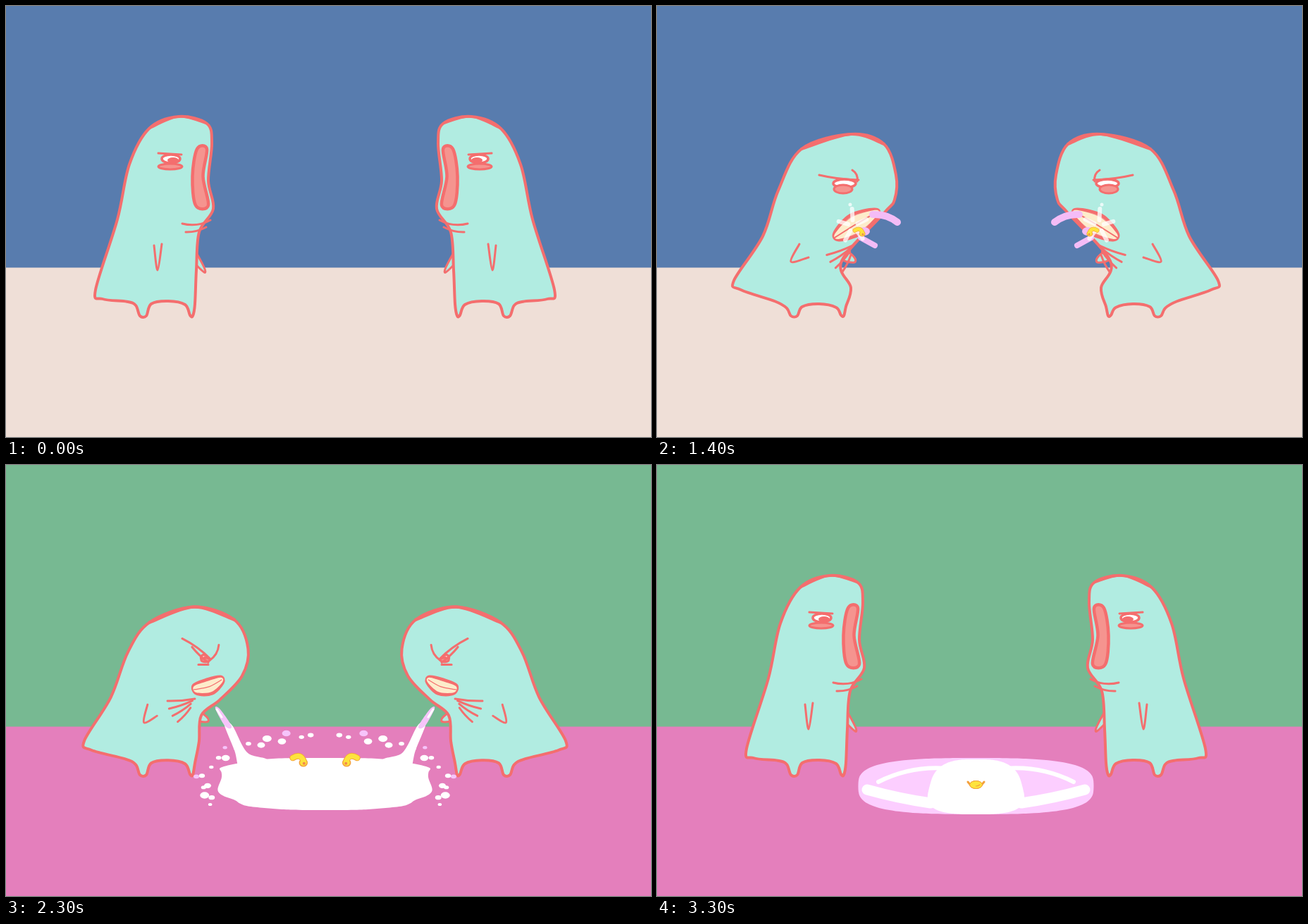
Recreate the animation shown at these times as an HTML page with a canvas. Size 915 px wide and 612 px high, loop 3400 ms.

```html
<!DOCTYPE html>
<html lang="en">
<head>
<meta charset="utf-8">
<title>Two queasy blobs</title>
<style>
html, body { margin: 0; width: 100%; height: 100%; overflow: hidden; background: #587cae; }
canvas { display: block; }
</style>
</head>
<body>
<canvas id="stage" width="915" height="612"></canvas>
<script>
const ctx = document.getElementById('stage').getContext('2d');
const LOOP = 3400, STEP = 100, AXIS = 452.5, HORIZON = 371.5;
const MINT = '#b1ece1', RED = '#f46e6e', PINK = '#f5948f', LILAC = '#fcceff', WHITE = '#fff',
  CREAM = '#fdeccb', YELLOW = '#fde33d', ORANGE = '#f4a13e', BLUE = '#5cc8ee';

// body: back, head and front from the rear corner to the belly
// mouth: x, y, width at both ends and the middle; bite: tooth heights
// eye, bag: x, y, rx, ry; arm: three points; marks: x0, y0, x1, y1, bend
const rest = {
  body: [127,403, 158,303, 175,225, 203,174, 245,157, 285,167, 292,195, 287,248, 294,288, 274,321, 270,375],
  hem: [419], crown: [3], mouth: [278,203,14, 272,242,15, 278,283,18], bite: [0, 0], cream: [0],
  hand: [281,375], arm: [210,340, 215,375, 221,338],
  eye: [234,217,13,6], pupil: [237,219,8,4], bag: [233,228,17,4],
  marks: [[216,209,249,211,0], [250,309,290,304,8], [255,321,284,314,4]]
};
const gape = {
  body: [114,412, 146,302, 166,225, 195,161, 240,143, 275,152, 283,182, 281,230, 294,300, 275,326, 267,385],
  hem: [424], crown: [4], mouth: [267,180,16, 263,232,20, 272,280,18], bite: [3, 2], cream: [0],
  hand: [291,356], arm: [212,341, 193,354, 222,349],
  eye: [230,213,10,9], pupil: [230,212,3,3], bag: [232,222,13,4],
  marks: [[216,205,232,197,0], [235,203,243,208,0], [214,216,217,224,1], [243,306,288,317,10]]
};
const retch = {
  body: [112,405, 148,308, 158,235, 182,169, 235,147, 279,156, 288,188, 283,235, 291,302, 272,343, 268,385],
  hem: [423], crown: [7], mouth: [265,184,37, 265,230,18, 270,283,28], bite: [8, 4], cream: [0],
  hand: [288,346], arm: [203,338, 189,346, 218,355],
  eye: [229,210,14,11], pupil: [231,209,0,0], bag: [241,219,8,4],
  marks: [[209,199,217,194,-3], [212,221,221,223,1], [237,228,247,229,1], [249,281,257,291,3], [253,320,284,317,6]]
};
const heave = {
  body: [109,390, 150,327, 172,262, 205,203, 275,182, 322,196, 339,240, 337,275, 322,294, 262,362, 275,400],
  hem: [423], crown: [4], mouth: [311,293,10, 282,310,30, 255,327,12], bite: [0, 0], cream: [1],
  hand: [280,361], arm: [202,338, 190,363, 215,357],
  eye: [266,252,16,6], pupil: [266,252,0,0], bag: [264,260,13,6],
  marks: [[230,240,286,247,3], [277,233,284,249,-6]], folds: [283,338,0.35]
};
const spew = {
  body: [111,392, 150,335, 179,271, 210,232, 270,214, 330,233, 352,278, 346,315, 308,344, 281,360, 277,395],
  hem: [419], crown: [4], mouth: [310,332,6, 292,333,20, 269,327,4], bite: [0, 0], cream: [0.8],
  hand: [285,366], arm: [200,340, 198,370, 215,357],
  eye: [297,289,0,0], pupil: [297,289,0,0], bag: [300,290,4,2],
  marks: [[266,262,306,291,-4], [280,274,303,296,2], [318,271,305,293,-6], [289,299,303,299,0]], folds: [290,347,0.08]
};
const gasp = {
  body: [111,391, 145,315, 156,250, 186,199, 257,166, 305,181, 319,212, 303,255, 291,302, 266,342, 265,385],
  hem: [420], crown: [6], mouth: [294,228,18, 279,262,24, 266,295,36], bite: [2, 2], cream: [0],
  hand: [285,350], arm: [203,341, 189,353, 212,354],
  eye: [235,229,17,15], pupil: [239,224,5,3], bag: [234,239,12,6],
  marks: [[218,213,231,206,-1], [220,246,228,250,1], [238,249,246,247,1], [268,241,273,230,0], [243,291,242,302,2],
    [253,327,288,313,5], [251,341,278,325,2]]
};
const poses = [[0, rest], [500, gape], [700, gape], [1000, retch], [1400, heave], [1700, spew],
  [2200, spew], [2500, gasp], [2900, gape], [3300, rest], [LOOP, rest]];

// time, x, y, angle
const swim = [[1400,287,320,0], [2000,405,437,0], [2500,423,405,0], [2900,438,456,-1.4], [LOOP,452,456,0]];

const lerp = (a, b, u) => a + (b - a) * u;
const clamp = v => Math.max(0, Math.min(1, v));
const mix = (a, b, u) => a.map((v, i) => lerp(v, b[i], u));
const random = n => Math.abs(Math.sin(n * 127.1 + 3.7) * 43758.5) % 1;
const loop = (n, f) => Array.from({ length: n }, (_, i) => f(i));

function span(keys, t) {
  let i = 0;
  while (i < keys.length - 2 && t >= keys[i + 1][0]) i++;
  const a = keys[i], b = keys[i + 1];
  return [a, b, (t - a[0]) / (b[0] - a[0])];
}

// Smooth curve through the points
function trace(p, closed) {
  const n = p.length / 2;
  const at = i => {
    i = closed ? (i + n) % n : Math.max(0, Math.min(n - 1, i));
    return [p[2 * i], p[2 * i + 1]];
  };
  ctx.beginPath();
  ctx.moveTo(p[0], p[1]);
  for (let i = 0; i < (closed ? n : n - 1); i++) {
    const [a, b, c, d] = [at(i - 1), at(i), at(i + 1), at(i + 2)];
    ctx.bezierCurveTo(b[0] + (c[0] - a[0]) / 6, b[1] + (c[1] - a[1]) / 6,
      c[0] - (d[0] - b[0]) / 6, c[1] - (d[1] - b[1]) / 6, c[0], c[1]);
  }
  if (closed) ctx.closePath();
}

function stroke(color, width) {
  ctx.strokeStyle = color;
  ctx.lineWidth = width;
  ctx.stroke();
}

function paint(fill, edge, width) {
  ctx.fillStyle = fill;
  ctx.fill();
  if (edge) stroke(edge, width);
}

function blob(p, fill, edge, width = 4) {
  trace(p, true);
  paint(fill, edge, width);
}

function line(p, color = RED, width = 3) {
  trace(p, false);
  stroke(color, width);
}

function bow([x0, y0, x1, y1, bend], color = RED, width = 3) {
  const dx = x1 - x0, dy = y1 - y0, k = bend / Math.hypot(dx, dy);
  ctx.beginPath();
  ctx.moveTo(x0, y0);
  ctx.quadraticCurveTo((x0 + x1) / 2 - dy * k, (y0 + y1) / 2 + dx * k, x1, y1);
  stroke(color, width);
}

function oval([x, y, rx, ry], fill, edge, width) {
  if (rx < 0.5 || ry < 0.5) return;
  ctx.beginPath();
  ctx.ellipse(x, y, rx, ry, 0, 0, 2 * Math.PI);
  paint(fill, edge, width);
}

// Boxy ellipse around the axis; taper widens its foot, rough bumps its rim
function puddle(cy, rx, ry, taper = 0, rough = 0) {
  const bend = v => Math.sign(v) * Math.abs(v) ** 0.65;
  return loop(32, i => {
    const a = (i + 0.5) * Math.PI / 16, s = bend(Math.sin(a));
    const r = 1 + rough * Math.sin(9 * Math.asin(Math.sin(a)));
    return [AXIS + rx * bend(Math.cos(a)) * (1 + taper * s) * r, cy + ry * s];
  }).flat();
}

function outline(p, h) {
  const [x, y] = [p[0] + 10, p[1] + 13];
  return [...p, 268,h + 4, 265,440, 261,439, 254,h + 5, 230,h, 206,h + 4, 199,440, 190,440, 184,h + 6,
    lerp(180, x, 0.2), lerp(h + 2, y, 0.25), x, y];
}

function drawMouth(m, bite, cream) {
  const dx = m[6] - m[0], dy = m[7] - m[1], len = Math.hypot(dx, dy);
  const nx = dy / len, ny = -dx / len;
  const side = (i, k) => [m[3 * i] + nx * m[3 * i + 2] * k, m[3 * i + 1] + ny * m[3 * i + 2] * k];
  const ring = k => [0, 1, 2].flatMap(i => side(i, k)).concat([2, 1, 0].flatMap(i => side(i, -k)));
  blob(ring(0.5), PINK, RED, 4.5);
  if (cream > 0.3) {
    blob(ring(0.38), CREAM);
    line(ring(0), RED, 2 * cream);
  }
  [0, 1].forEach(end => {
    const n = Math.round(m[6 * end + 2] / 7);
    loop(n, i => {
      const [x, y] = side(2 * end, ((i + 0.5) / n - 0.5) * 0.75);
      oval([x, y - 1 + 2 * end, 3, bite[end] / 2], WHITE);
    });
  });
}

function creature(t) {
  const [[, a], [, b], k] = span(poses, t);
  const u = k * k * (3 - 2 * k);
  const near = u < 0.5 ? a : b;
  const part = name => mix(a[name], b[name], u);
  const body = part('body'), eye = part('eye'), [hx, hy] = part('hand');

  blob([267,347, hx,hy - 4, hx,hy + 3, 265,361], MINT, RED, 3);
  blob(outline(body, part('hem')[0]), MINT, RED);
  line(body.slice(6, 12), RED, part('crown')[0]);
  line(part('arm'));
  drawMouth(part('mouth'), part('bite'), part('cream')[0]);
  oval(eye, WHITE, RED, 3.5);
  oval(part('pupil'), RED);
  oval(part('bag'), PINK, RED, 3);

  ctx.save();
  ctx.translate(eye[0] - near.eye[0], eye[1] - near.eye[1]);
  near.marks.forEach(m => bow(m));
  if (near.folds) folds(...near.folds);
  ctx.restore();
}

function folds(x, y, tilt) {
  loop(4, i => {
    const a = Math.PI - tilt - 0.25 * i, c = Math.cos(a), s = Math.sin(a), r = 6 + 4 * i;
    bow([x + 45 * c, y + 45 * s, x + r * c, y + r * s, 2]);
  });
}

function firstSpray() {
  const tongue = '#f4bcf6';
  bow([306,296,341,307,-7], tongue, 10);
  bow([289,329,309,340,0], tongue, 8);
  oval([294,320,8,6], tongue);
  ctx.globalAlpha = 0.75;
  loop(5, i => {
    const a = 3.4 + 1.25 * i, c = Math.cos(a), s = Math.sin(a);
    bow([278 + 7 * c, 312 + 8 * s, 278 + 21 * c, 312 + 24 * s, 0], WHITE, 6);
  });
  oval([274,282,2.5,2.5], WHITE);
  ctx.globalAlpha = 1;
}

function stream(t) {
  const grow = clamp((t - 1400) / 300);
  const reach = p => p.map((v, i) => lerp(i % 2 ? 345 : 299, v, grow));
  blob(reach([309,366, 321,370, 342,408, 370,419, 335,436, 324,405]), WHITE);
  blob(reach([297,346, 303,346, 320,371, 311,371]), '#f6c4fa');
  bow(reach([299,347,306,358]).concat(0), WHITE, 3);
}

function drops(t) {
  const age = (t - 2000) / 100;
  loop(20, i => {
    const a = lerp(-0.4, 1.45, i / 19), far = lerp(0.88, 1.02, random(i)), size = 2 + 3 * random(i + 50);
    const sway = 4 * Math.sin(age * (i + 1));
    oval([AXIS - 178 * far * Math.cos(a) + sway, 452 - 76 * far * Math.sin(a) + sway, size * 1.4, size],
      i % 6 === 5 ? '#f6c4fa' : WHITE);
  });
}

function liquid(t) {
  if (t === 1400) both(firstSpray, t);
  if (t >= 1500 && t < 2400) {
    const g = lerp(0.2, 1, clamp((t - 1500) / 400));
    if (t > 1500) {
      blob(puddle(453, 150 * g, 37 * g, -0.06, 0.04), WHITE);
      both(drops, t);
    }
    both(stream, t);
  }
  if (t < 2400) return;
  blob(puddle(456, 167, 40), LILAC);
  if (t < 2700) {
    trace(puddle(455, 160, 35), true);
    stroke(WHITE, 6);
  } else {
    both(() => {
      bow([314,450,412,431,-14], WHITE, 6);
      bow([298,461,388,480,3], WHITE, 15);
    });
  }
  blob(puddle(457, 66, 39, 0.15), WHITE);
}

function ripple(t) {
  if (t >= 2400 && t < 2700) {
    bow([402,435,408,435,4], BLUE, 1.5);
    oval([404,431,1.5,2], BLUE);
  }
  if (t < 2800 || t > 3000) return;
  bow([430,435,441,439,4], BLUE, 2.5);
  bow([447,438,453,433,-3], BLUE, 2);
  bow([447,439,453,440,0], BLUE, 2);
  loop(5, i => oval([441 + 10 * random(i), 422 + 10 * random(i + 9), 1.5, 1.2], BLUE));
}

function fish(t) {
  if (t < 1400 || t >= 3200) return;
  const [a, b, u] = span(swim, t);
  const [, x, y, turn] = mix(a, b, u);
  const size = t < 2300 ? 0.7 : 1, spine = [-9,-2,7,4,-11];
  ctx.save();
  ctx.translate(x, y);
  ctx.rotate(turn);
  ctx.scale(t >= 2800 ? -size : size, size);
  bow(spine, ORANGE, 9);
  oval([6,5,5.5,5], YELLOW, ORANGE, 1.5);
  bow(spine, YELLOW, 7);
  oval([7,6,2,2], '#f4894e');
  ctx.restore();
}

function meeting(t) {
  if (t < 3200) return;
  bow([441,450,446,456,0], ORANGE, 3);
  oval([AXIS,454,9,5.5], YELLOW, ORANGE, 1);
  bow([447,454,AXIS,456,1], ORANGE, 1.2);
}

function both(draw, t) {
  draw(t);
  ctx.save();
  ctx.translate(2 * AXIS, 0);
  ctx.scale(-1, 1);
  draw(t);
  ctx.restore();
}

function render(t) {
  const flash = t >= 1500 && t / STEP % 2 === 1;
  ctx.fillStyle = flash ? '#77b992' : '#587cae';
  ctx.fillRect(0, 0, 915, 612);
  ctx.fillStyle = flash ? '#e47fbc' : '#efdfd7';
  ctx.fillRect(0, HORIZON, 915, 612 - HORIZON);
  both(creature, t);
  liquid(t);
  [ripple, fish, meeting].forEach(draw => both(draw, t));
}

ctx.lineCap = ctx.lineJoin = 'round';
const start = performance.now();
function tick(now) {
  const t = Math.max(0, now - start) % LOOP;
  render(Math.floor(t / STEP) * STEP);
  requestAnimationFrame(tick);
}
render(0);
requestAnimationFrame(tick);
</script>
</body>
</html>
```
